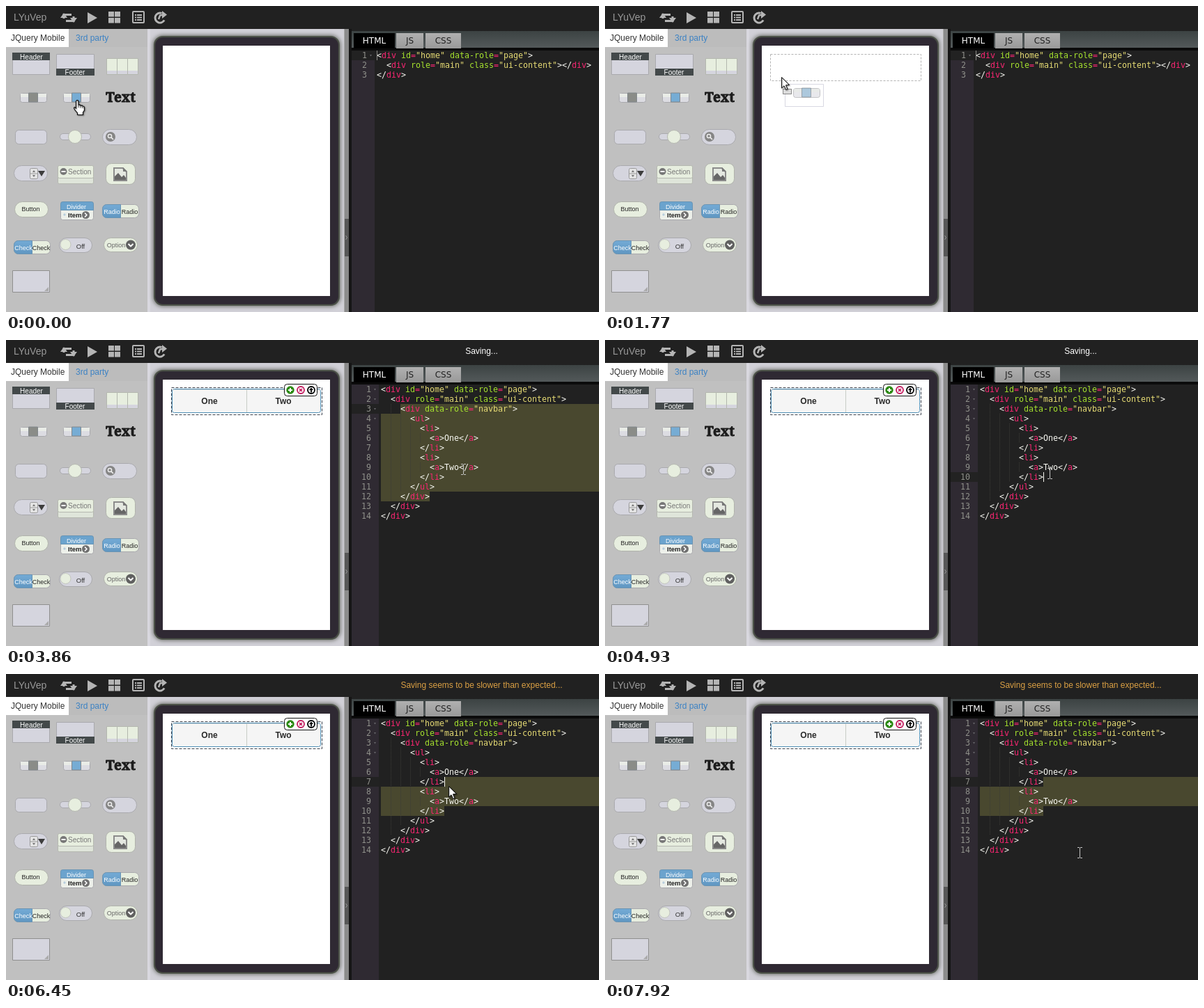
Write an HTML page with a canvas that moves like this. It is 851 px wide and 440 px high and loops after 8000 ms.

```html
<!DOCTYPE html>
<html lang="en">
<head>
<meta charset="utf-8">
<title>Visual page editor</title>
<style>
html, body { margin: 0; width: 100%; height: 100%; overflow: hidden; background: #212121; }
canvas { display: block; width: 851px; height: 440px; }
</style>
</head>
<body>
<canvas id="stage" width="851" height="440"></canvas>
<script>
const canvas = document.getElementById('stage');
let ctx = canvas.getContext('2d');
const LOOP = 8000, STEP = 60;
const LILAC = '#d5d5de', GREEN = '#e7eedf', BLUE = '#6ba3cd', EDGE = '#a9a9ad';
const SANS = '"Liberation Sans", Arial, sans-serif';
const MONO = '"DejaVu Sans Mono", monospace';
const ROW = 14, COL = 7, TOP = 64;

// ---------- helpers ----------
function rect(x, y, w, h, fill) {
  ctx.fillStyle = fill;
  ctx.fillRect(x, y, w, h);
}
function box(x, y, w, h, r, fill, stroke, lw = 1) {
  ctx.beginPath();
  ctx.roundRect(x, y, w, h, r);
  if (fill) { ctx.fillStyle = fill; ctx.fill(); }
  if (stroke) { ctx.strokeStyle = stroke; ctx.lineWidth = lw; ctx.stroke(); }
}
function disc(x, y, r, fill, stroke, lw = 1) {
  box(x - r, y - r, 2 * r, 2 * r, r, fill, stroke, lw);
}
function poly(points, fill, stroke, lw = 1, close = true) {
  ctx.beginPath();
  for (let i = 0; i < points.length; i += 2) ctx.lineTo(points[i], points[i + 1]);
  if (close) ctx.closePath();
  if (fill) { ctx.fillStyle = fill; ctx.fill(); }
  if (stroke) { ctx.strokeStyle = stroke; ctx.lineWidth = lw; ctx.stroke(); }
}
function line(stroke, lw, ...points) { poly(points, null, stroke, lw, false); }
function label(s, x, y, size, fill, align = 'left', weight = '', family = SANS) {
  ctx.font = `${weight} ${size}px ${family}`;
  ctx.textAlign = align;
  ctx.fillStyle = fill;
  ctx.fillText(s, x, y);
}
function fade(y0, y1, a, b) {
  const g = ctx.createLinearGradient(0, y0, 0, y1);
  g.addColorStop(0, a);
  g.addColorStop(1, b);
  return g;
}

// ---------- static scene ----------
function topBar() {
  rect(0, 0, 851, 33, '#212121');
  label('LYuVep', 11, 21, 14, '#999');
  const c = '#b5b5b5';
  line(c, 3, 83, 18, 83, 12.5, 94, 12.5);
  line(c, 3, 97, 15, 97, 21.5, 86, 21.5);
  poly([78, 17, 83, 10, 88, 17], c);
  poly([92, 17, 102, 17, 97, 24], c);
  poly([117, 9, 131, 17, 117, 25], c);
  for (const x of [147, 156]) for (const y of [8, 17]) rect(x, y, 8, 7.5, c);
  box(182, 8, 16, 16, 1, null, c, 2);
  for (const y of [12, 15.5, 19]) {
    rect(185, y, 2, 2, c);
    rect(188, y, 7, 2, c);
  }
  ctx.beginPath();
  ctx.arc(221, 17, 7, -1.2, 0.5, true);
  ctx.strokeStyle = c;
  ctx.lineWidth = 3;
  ctx.stroke();
  line(c, 2.5, 219, 19, 221, 13.5, 226, 12.5);
  poly([224, 7, 231, 12.5, 224, 18], c);
}

function segments(x, y, mid) {
  box(x + .5, y + .5, 38, 13, 3, '#dcdce2', EDGE);
  rect(x + 1, y + 1, 37, 5, '#e9ece7');
  box(x + 12.5, y, 13, 13, 0, mid, '#82888c');
}

function splitButton(x, y, text) {
  box(x + .5, y + .5, 52, 19, 6, GREEN, EDGE);
  box(x + .5, y + .5, 26, 19, [6, 0, 0, 6], fade(y, y + 20, '#74abd6', '#5f96c1'), '#6a94b3');
  label(text, x + 14, y + 13.5, 9, '#fff', 'center');
  label(text, x + 39.5, y + 13.5, 9, '#222', 'center');
}

function palette() {
  rect(0, 33, 203, 407, '#c0c0c0');
  rect(0, 33, 203, 26, '#bcbcbc');
  rect(0, 33, 90, 26, '#fff');
  label('JQuery Mobile', 7, 50, 12, '#333');
  label('3rd party', 100, 50, 12, '#3c82c4');

  box(9.5, 67.5, 53, 31, 0, LILAC, EDGE);
  rect(9, 67, 54, 11, '#43494a');
  label('Header', 36.5, 76.5, 10, '#fff', 'center');
  box(72.5, 69.5, 54, 30, 0, LILAC, EDGE);
  rect(72, 90, 55, 10, '#43494a');
  label('Footer', 99, 99, 10, '#fff', 'center');
  for (let i = 0; i < 3; i++) {
    box(144.5 + i * 15, 75.5, 15, 23, 0, GREEN, '#b3b7ae');
    rect(145 + i * 15, 93, 14, 5, LILAC);
  }

  segments(20, 125, '#8a8c88');
  segments(82, 125, '#76acd4');
  ctx.lineJoin = 'round';
  label('Text', 164.5, 138, 19, '#1b1b1b', 'center', '900', '"Noto Serif", serif');
  ctx.strokeStyle = '#1b1b1b';
  ctx.lineWidth = .9;
  ctx.strokeText('Text', 164.5, 138);

  box(13.5, 178.5, 45, 20, 5, LILAC, EDGE);
  box(77.5, 183.5, 44, 9, 5, LILAC, EDGE);
  disc(99, 188, 9.5, GREEN, '#b5b8b0');
  box(138.5, 177.5, 49, 22, 11, LILAC, EDGE);
  disc(150, 188, 7, '#858585');
  disc(149, 187, 2.6, null, '#eee', 1.5);
  line('#eee', 1.7, 151, 189, 154, 192);

  box(11.5, 229.5, 48, 22, 11, LILAC, EDGE);
  box(34.5, 233.5, 11, 15, 2, '#e4e4e4', '#999');
  line('#999', 1, 35, 241, 46, 241);
  poly([38, 239, 40, 236, 42, 239], '#777');
  poly([38, 243, 42, 243, 40, 246], '#777');
  poly([46, 237, 56, 237, 51, 245], '#3c3c3c');

  box(74.5, 229.5, 51, 26, 2, '#dfe5da', '#b5b8b0');
  box(74.5, 229.5, 51, 18, 2, GREEN, '#b5b8b0');
  disc(82.5, 238, 5, '#777');
  rect(79.5, 237, 6, 2, '#fff');
  label('Section', 89, 241.5, 10, '#777');

  box(143.5, 226.5, 42, 30, 8, GREEN, '#b0b3ac');
  poly([154, 232, 168, 232, 174, 238, 174, 252, 154, 252], '#8b8b8b');
  poly([156, 234, 167, 234, 172, 239, 172, 250, 156, 250], '#e4e8e0');
  poly([156, 250, 156, 245, 161, 240, 166, 246, 169, 243, 172, 247, 172, 250], '#666');
  poly([168, 232, 174, 238, 168, 238], '#777');

  box(12.5, 281.5, 48, 22, 11, GREEN, '#afb2ab');
  label('Button', 35.5, 295, 9, '#222', 'center');
  box(78.5, 281.5, 47, 26, 3, '#edf0ea', EDGE);
  box(78.5, 281.5, 47, 12, [3, 3, 0, 0], BLUE, '#6794b5');
  label('Divider', 101, 291.5, 9, '#fff', 'center');
  disc(84, 300, 1.7, '#b8cedd');
  label('Item', 89, 304, 9.5, '#222', 'left', 'bold');
  disc(114.5, 300.5, 5.5, '#707070');
  line('#fff', 1.6, 113, 297.5, 116, 300.5, 113, 303.5);
  splitButton(138, 285, 'Radio');

  splitButton(11, 337, 'Check');
  box(76.5, 333.5, 47, 21, 11, LILAC, EDGE);
  disc(85.5, 343, 7.5, GREEN, '#c2c5be');
  label('Off', 107, 349, 9.5, '#333', 'center');
  box(140.5, 333.5, 48, 20, 10, GREEN, '#afb2ab');
  label('Option', 158, 347, 9, '#666', 'center');
  disc(179, 343.5, 7, '#606060');
  line('#fff', 2, 175.5, 342, 179, 345.5, 182.5, 342);

  box(9.5, 380.5, 53, 31, 0, LILAC, '#8f8f8f');
  poly([61, 404, 61, 410, 55, 410], '#aaa');
}

function device() {
  rect(203, 33, 282, 407, '#d1d0d7');
  rect(203, 33, 4, 407, '#d9d8df');
  ctx.save();
  ctx.shadowColor = '#55584f';
  ctx.shadowBlur = 6;
  box(213, 44, 265, 386, 12, '#2f2933', '#4c5248', 2);
  ctx.restore();
  box(214.5, 45.5, 262, 383, 11, '#2f2933');
  rect(225, 57, 240, 360, '#fff');
  rect(485, 33, 7, 407, '#8b8b8b');
  rect(485, 33, 1, 407, '#aaa');
  rect(486, 306, 6, 54, '#575757');
  line('#999', 1, 487.5, 330, 489.5, 333, 487.5, 336);
}

function tab(x, w, text) {
  rect(x, 39, w, 22, fade(39, 61, '#b0b0b0', '#999'));
  label(text, x + w / 2, 54, 12, '#222', 'center', '', '"DejaVu Sans", sans-serif');
}

function editorFrame() {
  rect(492, 33, 359, 407, '#212121');
  rect(492, 33, 4, 407, '#151515');
  rect(496, 36, 355, 25, fade(36, 61, '#3c4343', '#545a5b'));
  rect(496, 60, 355, 4, '#0b0b0b');
  rect(499, 39, 59, 22, '#000');
  label('HTML', 528.5, 54, 12, '#fff', 'center', '', '"DejaVu Sans", sans-serif');
  tab(560, 39, 'JS');
  tab(602, 51, 'CSS');
}

// Paint the fixed parts once.
const backdrop = document.createElement('canvas');
backdrop.width = 851;
backdrop.height = 440;
const view = ctx;
ctx = backdrop.getContext('2d');
topBar();
palette();
device();
editorFrame();
ctx = view;

// ---------- code editor ----------
const BEFORE = `<div id="home" data-role="page">
  <div role="main" class="ui-content"></div>
</div>`.split('\n');
const AFTER = `<div id="home" data-role="page">
  <div role="main" class="ui-content">
    <div data-role="navbar">
      <ul>
        <li>
          <a>One</a>
        </li>
        <li>
          <a>Two</a>
        </li>
      </ul>
    </div>
  </div>
</div>`.split('\n');

function codeLine(text, x, y) {
  let prev = '';
  for (const m of text.matchAll(/<\/?|>|"[^"]*"|[\w-]+|=/g)) {
    const s = m[0];
    let color = '#f8f8f2';
    if (prev[0] === '<' || s === '=') color = '#f92672';
    else if (s[0] === '"') color = '#e6db74';
    else if (text[m.index + s.length] === '=') color = '#a6e22e';
    label(s, x + m.index * COL, y, 11.63, color, 'left', '', MONO);
    prev = s;
  }
}

// a and b are [row, col] with a before b
function selection(a, b, x) {
  for (let r = a[0]; r <= b[0]; r++) {
    const from = x + (r === a[0] ? a[1] * COL : 0);
    const to = r === b[0] ? x + b[1] * COL : 851;
    rect(from, TOP + r * ROW, to - from, ROW, '#49482f');
  }
}

function editor(s) {
  const lines = s.dropped ? AFTER : BEFORE;
  const x = s.dropped ? 538 : 532;
  const folds = s.dropped ? 4 : 1;
  rect(496, TOP, x - 3 - 496, 440 - TOP, '#2f2a32');
  rect(496, TOP + s.row * ROW, x - 3 - 496, ROW, '#222');
  if (s.select) selection(...s.select, x);
  lines.forEach((text, i) => {
    const y = TOP + i * ROW;
    label(i + 1, x - 14, y + 11, 11.63, '#8f908a', 'right', '', MONO);
    if (i < folds) poly([x - 10, y + 6, x - 7, y + 6, x - 8.5, y + 8.5], '#67666a');
    const depth = text.search(/\S/) / 2;
    for (let k = 1; k < depth; k++)
      for (let d = 0; d < ROW; d += 2) rect(x + k * 14, y + d, 1, 1, '#3b3b36');
    codeLine(text, x, y + 11);
  });
  if (s.caret) rect(x + s.caret[1] * COL, TOP + s.caret[0] * ROW, 1, ROW, s.dropped ? '#f8f8f0' : '#8a8a86');
}

// ---------- device content ----------
function dashed(x, y, w, h, color, dash) {
  ctx.save();
  ctx.setLineDash(dash);
  box(x + .5, y + .5, w, h, 0, null, color);
  ctx.restore();
}

function navbar(hover) {
  dashed(237, 68, 216, 39, '#39414d', [4, 2]);
  box(238.5, 70.5, 213, 34, 3, '#f5f5f5', '#4f8fb6');
  if (hover) rect(239, 71, 107, 33, GREEN);
  rect(239, 71, 212, 1, '#c9cfd2');
  rect(345, 71, 1, 33, '#c8ccc6');
  label('One', 292, 92, 12, '#2b2b2b', 'center', 'bold');
  label('Two', 398, 92, 12, '#2b2b2b', 'center', 'bold');
  box(399.5, 63.5, 47, 17, 4, '#fff', '#111');
  disc(408, 72, 5.7, '#2c8a13');
  line('#fff', 2, 408, 69, 408, 75);
  line('#fff', 2, 405, 72, 411, 72);
  disc(423, 72, 5, '#fff', '#c3195d', 1.8);
  line('#c3195d', 1.7, 421, 70, 425, 74);
  line('#c3195d', 1.7, 425, 70, 421, 74);
  disc(438, 72, 5, '#fff', '#000', 1.8);
  line('#000', 1.8, 438, 70, 438, 75.5);
  poly([435, 72, 438, 68.5, 441, 72], '#000');
}

function ghost(x, y) {
  if (x > 225) dashed(237, 69, 216, 38, '#b3b3b3', [3, 2]);
  ctx.save();
  ctx.globalAlpha = .65;
  box(x + 5.5, y + 10.5, 55, 32, 0, x > 225 ? '#fff' : null, '#c3c3d3');
  segments(x + 17, y + 16, '#8db7d6');
  ctx.restore();
}

// ---------- pointers ----------
function arrow(x, y) {
  ctx.save();
  ctx.translate(x, y);
  ctx.shadowColor = 'rgba(0,0,0,.4)';
  ctx.shadowBlur = 2;
  ctx.shadowOffsetX = ctx.shadowOffsetY = 1;
  poly([.5, .5, .5, 16, 4, 12.8, 6.6, 18.5, 9, 17.4, 6.5, 11.8, 11.5, 11.5], '#fff', '#111');
  ctx.restore();
}
function hand(x, y) {
  ctx.save();
  ctx.translate(x, y);
  ctx.shadowColor = 'rgba(0,0,0,.35)';
  ctx.shadowBlur = 2;
  ctx.shadowOffsetX = ctx.shadowOffsetY = 1;
  poly([3.5, 2, 4.5, .7, 6, .7, 7, 2, 7, 7, 9, 6.8, 10, 8, 12, 7.8, 13, 9, 14.5, 9.2, 15.5, 10.5,
    15.5, 15, 13.5, 18, 13.5, 21.5, 5.5, 21.5, 5.5, 19, 1.5, 14, .5, 11.5, 1.5, 10.5, 3.5, 12],
    '#fff', '#111', 1.2);
  line('#333', .8, 7, 7, 7, 11);
  line('#333', .8, 10, 8, 10, 11.5);
  line('#333', .8, 13, 9, 13, 12);
  ctx.restore();
}
function beam(x, y) {
  const c = '#c4c4c4';
  rect(x, y - 7, 1, 14, c);
  for (const d of [-8, 7]) {
    rect(x - 3, y + d, 3, 1, c);
    rect(x + 1, y + d, 3, 1, c);
  }
}

// ---------- timeline ----------
// Each run: start, end, then stops of [share of the run, x, y].
const RUNS = [
  [1230, 1950, [0, 101, 134], [.25, 145, 122], [.5, 205, 108], [.75, 253, 102], [1, 270, 100]],
  [3200, 3980, [0, 277, 101], [.25, 385, 128], [.5, 530, 163], [.77, 650, 185], [.85, 656, 186], [1, 643, 186]],
  [4300, 4600, [0, 643, 187], [.6, 639, 193], [1, 638, 194]],
  [4930, 5530, [0, 638, 192], [.5, 637, 177], [1, 635, 161]],
  [6980, 7460, [0, 638, 168], [.3, 656, 208], [.7, 684, 268], [1, 681, 257]]
];

function pointer(t) {
  const run = RUNS.findLast(r => t >= r[0]);
  if (!run) return [101, 135];
  const [start, end, ...stops] = run;
  const p = Math.min(1, Math.floor((t - start) / STEP) * STEP / (end - start));
  const i = Math.max(1, stops.findIndex(s => s[0] >= p));
  const [p0, x0, y0] = stops[i - 1], [p1, x1, y1] = stops[i];
  const k = (p - p0) / (p1 - p0);
  return [Math.round(x0 + (x1 - x0) * k), Math.round(y0 + (y1 - y0) * k)];
}

function spot([x, y]) {
  const row = Math.floor((y - TOP) / ROW);
  return [row, Math.min(AFTER[row].length, Math.round((x - 538) / COL))];
}

function editorState(t, mouse) {
  if (t < 1950) return { row: 0, caret: [0, 0] };
  const dropped = true;
  if (t < 4540) return { dropped, row: 2, select: [[2, 4], [11, 10]] };
  const anchor = [9, 13];
  if (t < 4930) return { dropped, row: 9, caret: anchor };
  const at = t < 5530 ? spot(mouse) : [6, 13];
  const lit = t < 6060 || (t >= 6450 && t < 6980) || (t >= 7460 && t < 7920);
  const select = at[0] < 9 ? [at, anchor] : null;
  return { dropped, row: at[0], caret: lit && at, select };
}

function cursor(t, [x, y]) {
  if (t < 1230) {
    if (t < 60) hand(97, 135);
    else if (t < 120) hand(98, 136);
    else if (t < 380) hand(99, 136);
    else if (t < 970) hand(97, 134);
    else hand(92, 129);
  } else if (t < 1950) {
    ctx.save();
    ctx.setLineDash([1, 1]);
    box(x + 2.5, y + 17.5, 12, 7, 0, '#ddd', '#222');
    ctx.restore();
    arrow(x, y);
  } else if (x < 535 || (t >= 5530 && y < 190)) arrow(x, y);
  else beam(x, y);
}

function draw(t) {
  const mouse = pointer(t);
  ctx.drawImage(backdrop, 0, 0);
  editor(editorState(t, mouse));
  if (t >= 5230) label('Saving seems to be slower than expected...', 682.5, 20, 12, '#dba044', 'center');
  else if (t >= 2480) label('Saving...', 682.5, 20, 12, '#fff', 'center');
  if (t >= 1950) navbar(t >= 2480 && mouse[0] < 346);
  else if (t >= 1230) ghost(...mouse);
  cursor(t, mouse);
}

const begin = performance.now();
function tick() {
  draw((performance.now() - begin) % LOOP);
  requestAnimationFrame(tick);
}
tick();
</script>
</body>
</html>
```
